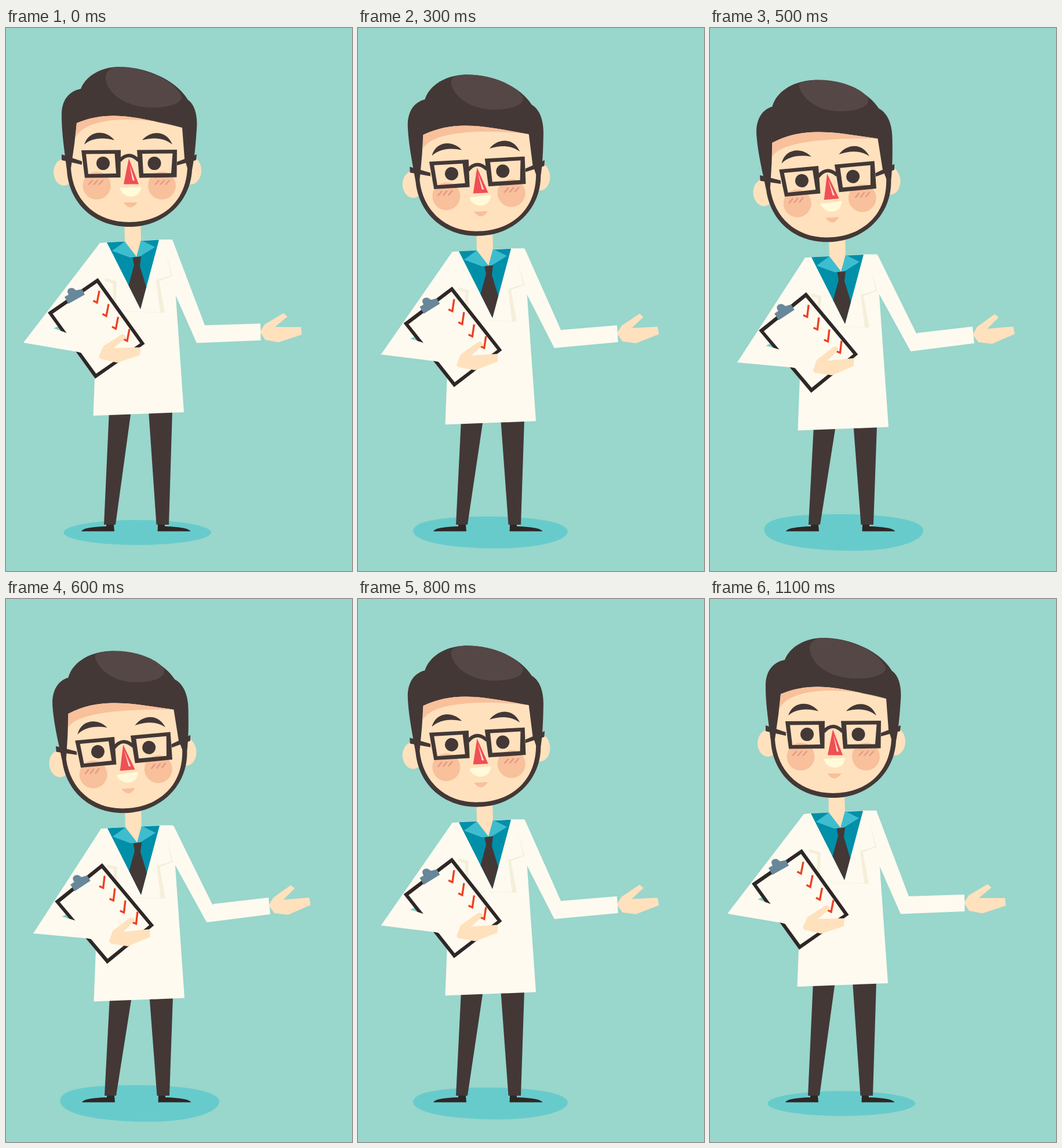
Recreate the animation shown at these times as an HTML page. Size 597 px wide and 937 px high, loop 1.15 s.

```html
<!DOCTYPE html>
<html lang="en">
<head>
<meta charset="utf-8">
<title>Presenting doctor</title>
<style>
  html, body { margin: 0; width: 100%; height: 100%; overflow: hidden; background: #99d6cc; }
  svg { display: block; width: 597px; height: 937px; }
  .dark { fill: #433836; }
  .ink { fill: #2e2726; }
  .skin { fill: #ffe1bd; }
  .blush { fill: #f8c09b; }
  .coat { fill: #fefaef; }
  .fold { fill: #f5efda; }
  .teal { fill: #008fa9; }
  .collar { fill: #3ebdcf; }
</style>
</head>
<body>
<svg viewBox="0 0 597 937">
  <path id="shadow" fill="#67cbcc"/>

  <path id="legs" class="dark"/>
  <path id="shoes" class="ink" d="M173 857H186L187 868.500H130Q133 861 173 860Z M262 857H274V860Q314 861 318.500 868.500H261.500Z"/>

  <path id="rightUpperArm" class="coat"/>
  <g id="rightForearm">
    <path class="skin" d="M438 524L447 511L479 492L485.500 498L464 516L509 516L510.500 529L470 542.500L447 538Z"/>
    <path class="coat" d="M343 513L439 510L439.500 539L329 543.500Z"/>
  </g>

  <g id="torso">
    <path class="coat" d="M162 371L174 370L264 365L287 365L291 435L307 663L150.500 669Z"/>
    <path class="teal" d="M174 370L264 365.500L232 485Z"/>
    <path class="skin" d="M204 330H232L233 367L225 396L205 370Z"/>
    <path class="collar" d="M205 368.500L183 384.500L214 396L225.500 395ZM233 366L257 378L230 395L225.500 395Z"/>
    <path class="dark" d="M218.500 396L233 394L231 411L242 447L232 485L211.500 444L221 409Z"/>
    <path class="fold" d="M276 389L287.500 428L264 437L274 491L266 491.500L259 435L285 427ZM167 390L163 429L191 437L189.500 492L184.500 470L185 441L161 434Z"/>
    <path d="M205 489L273 491" stroke="#f8f2e0" fill="none"/>
  </g>

  <path id="leftUpperArm" class="coat"/>
  <g id="leftForearm">
    <path fill="#86cdc5" d="M80 519L91 514.500L106 528Z"/>
    <path class="ink" d="M72 491L158.500 431.500L239.500 545L154 605Z"/>
    <path class="coat" d="M80.500 493L157 440L231.500 544L155.500 596.500Z"/>
    <path fill="#68879a" d="M101 464L108 460C103 452 109 448 114 448.500C119 449 119 454 124 452L131 450.500L136 460L107.500 476Z"/>
    <g id="ticks" fill="none" stroke="#ee4023" stroke-width="3.400"/>
    <path class="coat" d="M30 543L82 518L104 526L166 549L161 569L124 559Z"/>
    <path class="skin" d="M160 567L168 549L199 529Q204 527 207.500 534L186 552L232 551L231 564.500L192 577.500L163 571Z"/>
  </g>

  <g id="head">
    <g class="skin">
      <ellipse cx="100" cy="249" rx="18" ry="23"/>
      <ellipse cx="319" cy="246" rx="18" ry="24"/>
    </g>
    <path id="hair" class="dark"/>
    <path id="shine" fill="#554746"/>
    <path class="skin" d="M122 164C180 140 230 155 304 172L308 225L313 242C310 301 269 335 212 335C154 335 115 296 112 242L118 200Z"/>
    <path id="brow" class="blush"/>
    <g class="blush">
      <circle cx="156.500" cy="272" r="24"/>
      <circle cx="269" cy="272" r="24"/>
      <path d="M203 301H226.500Q221 309.500 214.500 309.500Q208 309.500 203 301Z"/>
    </g>
    <g id="cheekLines" stroke="#e29a88" stroke-width="2.500"/>
    <path fill="#fffad9" d="M196 276Q214 275 233.500 274Q231 291 215 291Q201 290 196 276Z"/>
    <path fill="#ef4f55" d="M212 225L203 269.500L229 269.500Z"/>
    <path fill="#fde0d0" d="M213 235L222 263.500L218.500 263Z"/>
    <g class="dark">
      <path d="M135 201C143 176 172 175 187 193.500C166 188 148 190 135 201Z"/>
      <path d="M235 193.500C250 176 277 176 287 201C273 190 257 188 235 193.500Z"/>
      <circle cx="167.500" cy="233.500" r="11.500"/>
      <circle cx="256" cy="233.500" r="11.500"/>
      <path fill-rule="evenodd" d="M130 211L198 210.500L197.500 258L136 258.500ZM138 217.500L187.500 217L190 251L142 252Z"/>
      <path fill-rule="evenodd" d="M226 210.500L295 210L294.500 257.500L230 258.500ZM235 217L287.500 216.500L285 250.500L237 251Z"/>
      <path d="M96 218L131 230V236L96 228ZM329 218L295 231V237L328 228Z"/>
    </g>
    <path d="M196 229Q212 211 229 229" fill="none" stroke="#433836" stroke-width="6"/>
  </g>
</svg>
<script>
const STEP_MS = 50, STEPS = 23, PEAK = 11;
const el = id => document.getElementById(id);

// Each shape blends from its upright form to its lowered form.
const morphs = {
  shadow: [
    "M99.5 870.5C99.5 858.6 156.4 849 226.7 849C297 849 354 858.6 354 870.5C354 882.4 297 892 226.7 892C156.4 892 99.5 882.4 99.5 870.5Z",
    "M92.5 866C92.5 845 139 839 225 839C319 839 367 851 367 867C367 888 309 902 249 902C159 902 92.5 889 92.5 866Z"],
  legs: [
    "M178 660L216 660L189 857L169 857ZM246 660L287 660L281 857L259.5 857Z",
    "M178 686L216 686L189 857L169 857ZM246.5 686L287 686L281 857L259.5 857Z"],
  rightUpperArm: [
    "M287 365L343 513L360 528L329 543.5L293 462L270 410Z",
    "M288 391L355 527L372 540L345 557.5L292 461L270 420Z"],
  leftUpperArm: [
    "M162 371L30 543L160 520L175 400Z",
    "M163 396.600L46 577L169 545L176 426Z"],
  hair: [
    "M105 245C100 205 96 180 96 150C96 125 108 109 129 105C138 82 165 67 195 67C240 67 292 88 314 124C326 132 331 152 329 175C327 205 325 225 321 245C318 302 271 343 213 343C150 343 108 300 105 245Z",
    "M105 245C100 205 96 180 96 150C96 125 107 106 127 102C136 77 165 62 197 62C240 62 291 84 310 120C326 130 331 152 329 175C327 205 325 225 321 245C318 302 271 343 213 343C150 343 108 300 105 245Z"],
  shine: [
    "M192 67C235 67 290 88 303 118C305 128 285 136 262 137C205 140 172 110 172 85C172 76 180 68 192 67Z",
    "M197 62C244 62 284 83 293 101C296 113 280 120 254 120C205 121 178 90 176 70C176 64 184 62 197 62Z"],
  brow: [
    "M122 164C180 140 230 155 304 172C238 152 140 150 120 189Z",
    "M122 164C180 140 230 155 304 172C215 163 133 164 120 189Z"]
};

function blend([from, to], p) {
  const ends = to.match(/[\d.]+/g);
  let i = 0;
  return from.replace(/[\d.]+/g, n => (+n + (ends[i++] - n) * p).toFixed(2));
}

function addPaths(id, list) {
  el(id).innerHTML = list.map(d => `<path d="${d}"/>`).join("");
}

addPaths("ticks", [[161, 453.5], [177, 476.5], [193.5, 498.5], [213, 519.5]]
  .map(([x, y]) => `M${x} ${y}l-4 20.500l-6.500 -3.500`));
addPaths("cheekLines", [142, 151, 160, 257, 266, 275]
  .map(x => `M${x} 270.500l7.500 -8`));

function place(id, dx, dy, angle = 0, cx = 0, cy = 0) {
  el(id).setAttribute("transform", `translate(${dx} ${dy}) rotate(${angle} ${cx} ${cy})`);
}

function draw(time) {
  const step = Math.floor(time / STEP_MS) % STEPS;
  const k = step <= PEAK ? step : 2 * PEAK - step;
  const nudge = k >= 7 ? 1 : 0;
  const drop = 2.56 * k;

  for (const id in morphs) el(id).setAttribute("d", blend(morphs[id], k / 10));
  for (const id of ["shadow", "legs", "shoes", "rightUpperArm", "leftUpperArm"]) place(id, nudge, 0);
  place("torso", nudge, drop);
  place("head", nudge, drop, -0.47 * k, 216, 358);
  place("leftForearm", nudge + 1.3 * k, 2.45 * k, -0.43 * k, 156, 518);
  place("rightForearm", nudge + 1.45 * k, 0.95 * k, -0.49 * k, 387.5, 526);
}

const start = performance.now();
function tick(now) {
  draw(Math.max(0, now - start));
  requestAnimationFrame(tick);
}
draw(0);
requestAnimationFrame(tick);
</script>
</body>
</html>
```
